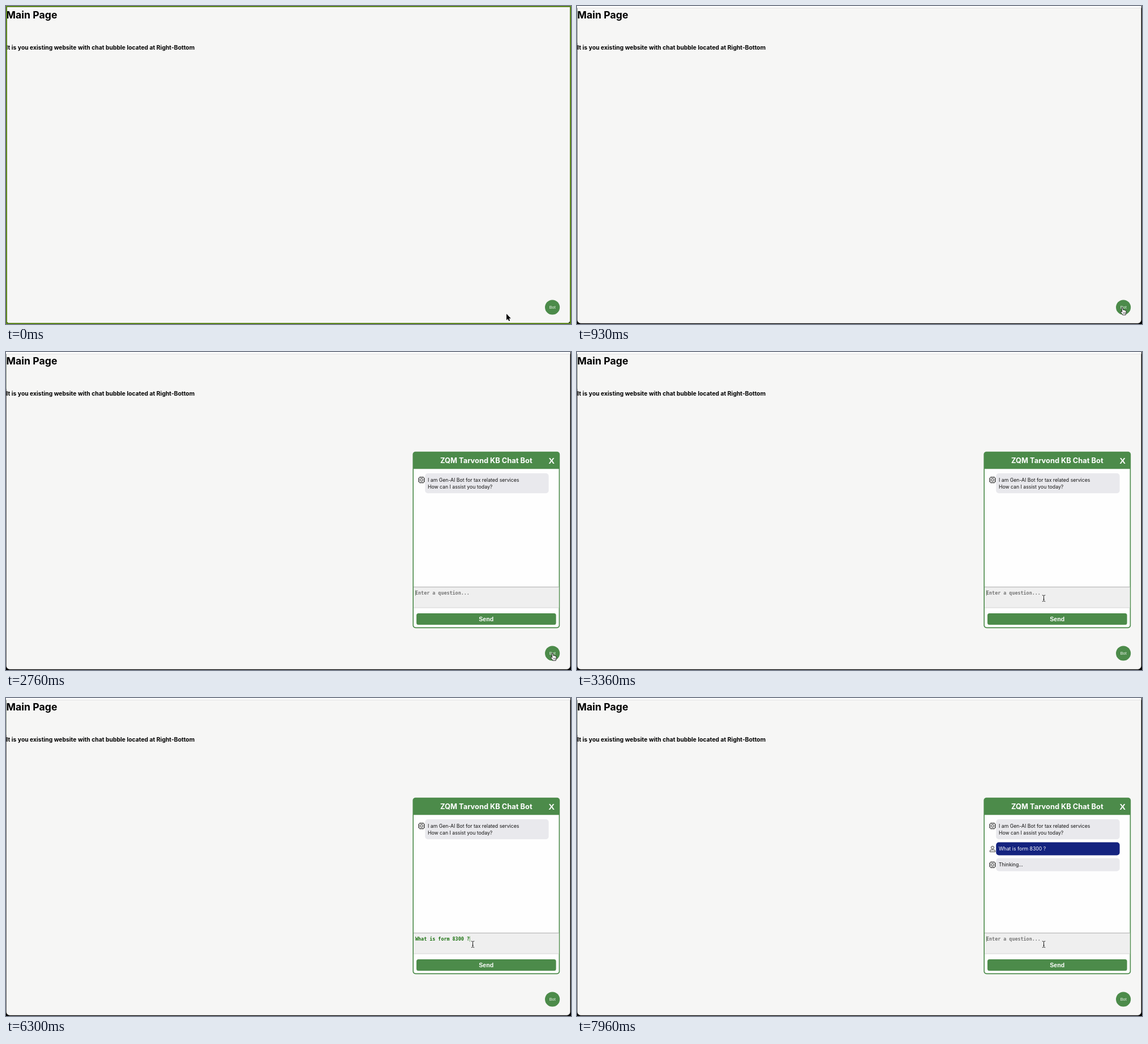
Write an HTML page with a canvas that moves like this. It is 998 by 561 pixels and loops after 8 s.

```html
<!DOCTYPE html>
<html lang="en">
<head>
<meta charset="utf-8">
<title>Chat bubble demo</title>
<style>
  html, body { margin: 0; width: 998px; height: 561px; overflow: hidden; background: #000; }
  canvas { display: block; width: 998px; height: 561px; }
</style>
</head>
<body>
<canvas id="stage"></canvas>
<script>
const W = 998, H = 561, LOOP = 8000;
const GREEN = '#4c8b4a', PAGE = '#f6f6f5', GREY = '#e9e9ed', NAVY = '#14237f';
const SANS = 'Inter, sans-serif';
const ARIAL = '"Liberation Sans", Arial, sans-serif';
const MONO = '"DejaVu Sans Mono", monospace';

const QUESTION = 'What is form 8300 ?';
const BORDER_END = 60, OPEN = 2330, TYPE_START = 4935, TYPE_STEP = 73.5, SENT = 6440;

const canvas = document.getElementById('stage');
const ctx = canvas.getContext('2d');
const dpr = window.devicePixelRatio || 1;
canvas.width = W * dpr;
canvas.height = H * dpr;

function rect(x, y, w, h, color) {
  ctx.fillStyle = color;
  ctx.fillRect(x, y, w, h);
}

function round(x, y, w, h, r, color) {
  ctx.beginPath();
  ctx.roundRect(x, y, w, h, r);
  ctx.fillStyle = color;
  ctx.fill();
}

function text(str, x, y, font, color, align = 'left') {
  ctx.font = font;
  ctx.fillStyle = color;
  ctx.textAlign = align;
  ctx.fillText(str, x, y);
}

function stroke(path, color, width) {
  ctx.strokeStyle = color;
  ctx.lineWidth = width;
  ctx.stroke(new Path2D(path));
}

// Cursor route: time, x, y
const route = [
  [0, 884, 543], [530, 932, 512], [830, 962, 531], [930, 963, 532],
  [1860, 963, 532], [1960, 966, 532], [2730, 966, 532], [3360, 824.5, 434.5]
];

function cursorAt(t) {
  let i = 0;
  while (i < route.length - 1 && route[i + 1][0] <= t) i++;
  const a = route[i], b = route[i + 1];
  if (!b) return [a[1], a[2]];
  let k = (t - a[0]) / (b[0] - a[0]);
  if (i === 0) k = k * k * (1.6 - 0.6 * k);
  else if (i === 1) k = k * (2 - k);
  else k = k * k * (3 - 2 * k);
  return [a[1] + (b[1] - a[1]) * k, a[2] + (b[2] - a[2]) * k];
}

function cursorKind(x, y, open) {
  if (Math.hypot(x - 965, y - 531.5) < 13) return 'hand';
  if (open && x > 720 && x < 977) {
    if (y > 415 && y < 451) return 'beam';
    if (y > 461 && y < 481 && x > 725 && x < 972) return 'hand';
  }
  return 'arrow';
}

const ARROW = new Path2D('M0 0V11.2L2.5 8.9L4.3 12.8L6.2 12L4.5 8.2H7.9Z');
const HAND = new Path2D('M-1 .6Q0-.7 1 .6L1.6 4.2Q2.8 3.4 3.5 4.6Q4.8 4 5.4 5.2Q6.8 5 7 6.6L7.2 9Q7 10.6 6.2 11.6V13H.6L.3 11.8L-2.6 8.4Q-3.2 6.6-1.6 6.8L-.2 8Z');

function drawCursor(t) {
  const [x, y] = cursorAt(t);
  const kind = cursorKind(x, y, t >= OPEN);
  ctx.save();
  ctx.translate(x, y);
  ctx.lineJoin = 'round';
  if (kind === 'arrow') {
    ctx.strokeStyle = '#fff';
    ctx.lineWidth = 1.6;
    ctx.stroke(ARROW);
    ctx.fillStyle = '#000';
    ctx.fill(ARROW);
  } else if (kind === 'hand') {
    ctx.fillStyle = '#fff';
    ctx.fill(HAND);
    ctx.strokeStyle = '#111';
    ctx.lineWidth = 0.9;
    ctx.stroke(HAND);
    stroke('M2.2 8.2V11M3.8 8.2V11M5.4 8.2V11', '#111', 0.6);
  } else {
    stroke('M-2.7-5.5Q0-5.5 0-4Q0-5.5 2.7-5.5M0-4V4M-2.7 5.5Q0 5.5 0 4Q0 5.5 2.7 5.5M-1.2 1.8H1.2', '#222', 1);
  }
  ctx.restore();
}

function drawPage(t) {
  rect(0, 0, W, H, '#000');
  round(0.6, -12, 996, 571.8, 6, PAGE);
  rect(0, 0, 997, 3, '#fff');
  rect(0, 3, 997, 0.8, '#dcdcdc');
  rect(0, 4, 0.6, 61, '#a9b8a6');
  text('Main Page', 0.5, 22.4, `700 17.7px ${SANS}`, '#000');
  text('It is you existing website with chat bubble located at Right-Bottom',
    0.5, 76.9, `700 10.35px ${SANS}`, '#000');
  round(952, 518.4, 26.2, 26.2, 13.1, GREEN);
  text('Bot', 965.2, 534.1, `7.3px ${ARIAL}`, '#eef5ee', 'center');
  if (t < BORDER_END) {
    rect(0, 0, W, 4, PAGE);
    ctx.strokeStyle = '#5c861c';
    ctx.lineWidth = 2;
    ctx.strokeRect(1, 1, W - 2, H - 2);
  }
}

function chipIcon(y) {
  ctx.save();
  ctx.translate(734, y);
  const pins = [-2.5, 0, 2.5].map(p =>
    `M${p}-6V-4.5M${p} 4.5V6M-6 ${p}H-4.5M4.5 ${p}H6`).join('');
  stroke(pins, '#222', 0.9);
  ctx.lineWidth = 1;
  ctx.beginPath();
  ctx.roundRect(-4.5, -4.5, 9, 9, 1.2);
  ctx.roundRect(-2, -2, 4, 4, 0.5);
  ctx.stroke();
  ctx.restore();
}

function personIcon(y) {
  ctx.save();
  ctx.translate(734, y);
  ctx.beginPath();
  ctx.arc(0, -2.4, 2.5, 0, Math.PI * 2);
  ctx.strokeStyle = '#222';
  ctx.lineWidth = 0.9;
  ctx.stroke();
  stroke('M-4.7 5V4Q-4.7 1.7-2.3 1.7H2.3Q4.7 1.7 4.7 4V5Z', '#222', 0.9);
  ctx.restore();
}

function message(y, h, lines, fill, color) {
  round(740.2, y, 218.4, h, 5, fill);
  lines.forEach((line, i) =>
    text(line, 745, y + 14.5 + i * 12.5, `400 8.7px ${SANS}`, color));
}

function caret(x, color) {
  rect(x, 420.3, 0.8, 9.6, color);
}

function drawInput(t) {
  const font = `700 8.38px ${MONO}`;
  const age = t - TYPE_START;
  const typing = age >= 0 && t < SENT;
  if (typing) {
    const count = Math.min(QUESTION.length, Math.floor(age / TYPE_STEP) + 1);
    const shown = QUESTION.slice(0, count);
    text(shown, 723, 428.2, font, '#176f0c');
    // The caret returns shortly after each key press
    if (age - (count - 1) * TYPE_STEP > 40)
      caret(723 + ctx.measureText(shown).width, '#5b9b50');
    return;
  }
  text('Enter a question...', 723, 428.2, font, '#757575');
  const since = t < SENT ? t - OPEN : t - SENT;
  if (since % 1020 < 515) caret(723.2, '#5d7d58');
}

function drawPanel(t) {
  round(718.4, 175.8, 259.8, 311.4, 5, GREEN);
  round(720, 206.3, 256.6, 279.3, [0, 0, 4, 4], '#fefefe');
  text('ZQM Tarvond KB Chat Bot', 848.3, 196, `700 12.85px ${SANS}`, '#fff', 'center');
  text('X', 963.6, 197.4, `700 15.5px ${ARIAL}`, '#fff', 'center');

  chipIcon(225.7);
  message(214, 35.2, ['I am Gen-AI Bot for tax related services', 'How can I assist you today?'], GREY, '#111');
  if (t >= SENT) {
    personIcon(266.3);
    message(254.5, 23, ['What is form 8300 ?'], NAVY, '#fff');
    chipIcon(294.3);
    message(282.5, 23, ['Thinking...'], GREY, '#111');
  }

  rect(720, 414.2, 256.6, 37.2, '#efefef');
  rect(720, 414.2, 256.6, 0.9, '#a6a6a6');
  rect(720, 450.7, 256.6, 0.8, '#cfcfcf');
  drawInput(t);
  round(725, 461, 246.6, 20.2, 3.5, GREEN);
  text('Send', 848.2, 474.7, `700 10.6px ${ARIAL}`, '#fff', 'center');
}

function draw(t) {
  ctx.setTransform(dpr, 0, 0, dpr, 0, 0);
  drawPage(t);
  if (t >= OPEN) drawPanel(t);
  drawCursor(t);
}

const start = performance.now();
function tick() {
  draw((performance.now() - start) % LOOP);
  requestAnimationFrame(tick);
}
tick();
</script>
</body>
</html>
```
